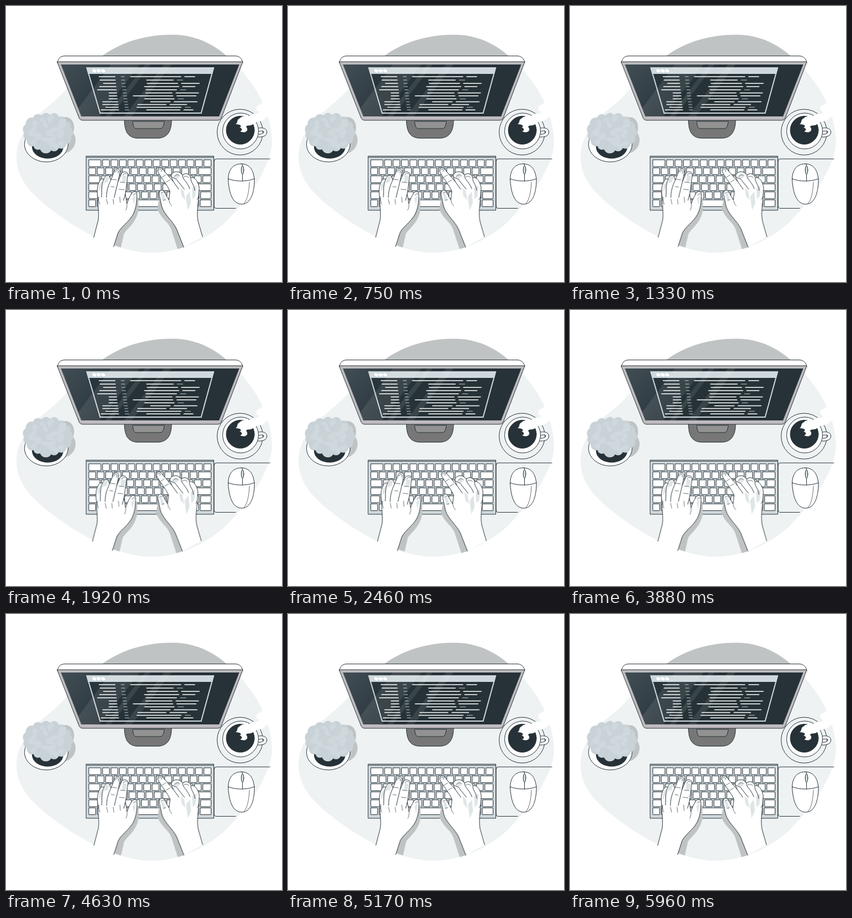
An HTML page for the animation above (6 s loop, 500x500 px).

```html
<!DOCTYPE html>
<html lang="en">
<head>
<meta charset="utf-8">
<title>Typing at a desk</title>
<style>
  html, body { margin: 0; width: 100%; height: 100%; overflow: hidden; background: #fff; }
  svg { display: block; width: 100vw; height: 100vh; }
  .line { fill: none; stroke: #263238; stroke-linecap: round; stroke-linejoin: round; }
  .thin { stroke-width: .7; }
  .white { fill: #fff; }
  .pale { fill: #cfd8dc; }
  .dark { fill: #263238; }
  .bezel { fill: #bebbbf; }
  .stand { fill: #777; }
  .inset { fill: #929292; }
  .shade { fill: #dfe5e7; }
  .shadow { fill: #bfc3c3; }
</style>
</head>
<body>
<svg viewBox="0 0 500 500">
  <defs>
    <path id="blob" d="M19 273C19 238 45 206 75 183C103 162 130 122 172 92C210 64 255 52 301 52C350 52 388 75 420 110C460 152 482 200 482 250C478 292 442 348 394 395C358 425 315 447 262 447C215 447 150 418 100 382C55 349 19 320 19 273Z"/>
    <clipPath id="inBlob"><use href="#blob"/></clipPath>
    <clipPath id="inScreen"><path id="screen" d="M99.500 106H422.500L386 200H136.500Z"/></clipPath>
    <linearGradient id="glass" x2="1" y2=".25">
      <stop offset="0" stop-color="#414e54"/>
      <stop offset=".25" stop-color="#344047"/>
      <stop offset=".5" stop-color="#263238"/>
    </linearGradient>
  </defs>

  <use href="#blob" fill="#eef2f3"/>
  <path d="M150 40H420V93H150Z" fill="#c0c3c3" clip-path="url(#inBlob)"/>

  <!-- monitor -->
  <path class="line stand" d="M214.500 206C214.500 229 222 239.500 240 239.500H274C291 239.500 300 229 300 206Z"/>
  <path class="line inset" d="M229.500 209H287L285 218Q284 222 279 222H237Q232 222 231 218Z"/>
  <path class="line white" d="M93 102C95 95 98 91 106 90.500H416C423 91 427 95 429 102Z"/>
  <path class="line bezel" d="M93 101H429L390 203Q388 207 384 207H139Q134 207 132.500 203Z"/>
  <use href="#screen" fill="url(#glass)"/>
  <g clip-path="url(#inScreen)">
    <path d="M146.500 112H376L353.500 194H170.500Z" fill="#263238" fill-opacity=".8" stroke="#cfd8dc" stroke-width="2"/>
    <path class="pale" d="M145.500 111.500H377L374 123H148.500Z"/>
    <g id="dots" class="white"></g>
    <g id="code" stroke-width="1.500"></g>
    <path d="M190 106H242L170 200H120ZM252 106H262L190 200H180ZM286 106H300L228 200H214Z" fill="#fff" opacity=".09"/>
  </g>

  <!-- plant -->
  <path class="shadow" d="M98 203C118 196 127 212 122 230C132 244 123 266 102 268Z"/>
  <ellipse class="line white" cx="73" cy="250.500" rx="39.500" ry="32"/>
  <ellipse class="dark" cx="75.500" cy="255" rx="28.500" ry="21.500"/>
  <g id="leaves"></g>

  <!-- coffee -->
  <circle class="line" cx="424" cy="228.500" r="41.500"/>
  <path class="line white" d="M452 223C460 219 472 220 472.500 228C473 237 462 238 453 237V232C460 233 467 232 467 228C467 225 460 226 453 229Z"/>
  <circle class="line white" cx="425" cy="226.500" r="32.500"/>
  <circle class="line dark" cx="424.500" cy="225" r="25.500"/>
  <path class="white" d="M416 214C421 211 417 206 424 203C429 197 437 203 444 197C451 193 455 198 459 192C451 189 452 180 460 179C465 173 474 175 478 181L482 199C478 203 475 198 469 204C463 211 455 207 449 213C443 219 437 214 435 219C441 225 434 232 424 227C430 225 427 221 423 220C429 218 424 214 416 214Z"/>

  <!-- mouse and pad -->
  <path class="line" d="M478 277H381Q377 277 377 281V362Q377 366.500 381 366.500H416"/>
  <path class="line white" d="M426 286C441 286 448 296 450 314C450 341 442 359 427 359C412 359 404 342 402.500 314C403 296 411 286 426 286Z"/>
  <path class="line" d="M402.500 313C416 318.500 436 318.500 450 313M428.500 286V317"/>
  <path class="line thin" d="M441 319C440 339 437 351 431 358"/>
  <ellipse class="line pale" cx="428.500" cy="297" rx="2.300" ry="8"/>

  <!-- keyboard -->
  <path class="line pale" d="M145.500 272H376.500V370H145.500Z"/>
  <path class="line" d="M145.500 274H376.500"/>
  <g id="keys" class="line white"></g>

  <!-- hands -->
  <g id="hands">
    <g class="shadow" clip-path="url(#inBlob)">
      <path d="M236 345L240 348V370C236 392 222 401 214 412L207 442L193 437L203 408Z"/>
      <path d="M279 340L274 368C283 388 296 392 300 407L311 441L323 437L309 402Z"/>
    </g>

    <path class="line white" d="M159 419L167 388C169 376 166 362 167 350C164 338 165 325 169 319C171 313 175 312 177 314C179 307 186 304 188 310L190 315L196 300C198 293 206 294 206.500 299C206 306 204 312 203 318L209 304C211 299 220 299 221 305C219 318 218 330 216 341Q218 350 219 358C222 350 226 340 230 337C234 334 238 338 237 343C237 355 236 366 230 378C222 392 208 400 203 411L195 436"/>
    <path class="shade" d="M178 314C181 307 187 307 187 311L184 319L177 321ZM169 323L175 317L172 331L168 336ZM211 306L219 308L217 318L210 320ZM229 349L235 342L232 361Z"/>
    <path class="line" d="M177 314C172 325 174 335 173 346M190 315C184 328 182 336 182 347M203 318L196 347M216 341L213 352"/>
    <path class="line thin" d="M198 301Q199 296 204 299L203 303M212 306Q213 302 219 304M231 343Q232 338 236 341M192 314L200 315M190 327L196 328M207 319L216 320M205 332L214 333M168 346Q167 354 170 359M182 350L184 359M194 350L195 359M206 346L207 356M219 358Q220 365 217 370"/>

    <path class="line white" d="M322 437L309 404C302 389 287 379 282 363L278 344C276 337 280 332 284 334C288 337 290 344 295 351L297 336C293 325 281 312 275 300C273 294 280 290 284 296L303 318L299 309C300 301 307 299 314 301L320 306C325 302 332 303 335 311C342 309 348 318 350 329L349 345C348 360 345 375 348 390L356 418"/>
    <path class="shade" d="M303 309L309 304L316 308L309 314ZM316 330L322 335L325 352L318 344ZM326 345L333 336L335 357L329 370ZM337 330L345 325L343 345L338 350ZM281 341L285 339L289 351L284 353Z"/>
    <path class="line" d="M303 318L313 332M299 309C304 313 309 312 311 317L323 332M320 306C318 313 328 317 333 331M335 311C333 318 341 323 342 334"/>
    <path class="line thin" d="M276 298Q278 294 282 297L281 300M283 310L289 306M290 319L297 315M305 309Q309 303 314 307M322 310Q327 306 331 311M281 340Q281 336 285 338M295 351Q296 358 300 362M285 352L289 351M349 345L346 351"/>
  </g>
</svg>

<script>
  const $ = id => document.getElementById(id);

  function add(parent, tag, attrs) {
    const el = document.createElementNS('http://www.w3.org/2000/svg', tag);
    for (const name in attrs) el.setAttribute(name, attrs[name]);
    $(parent).append(el);
  }

  // Seeded random number between two bounds
  let seed = 7;
  function rand(min, max) {
    seed = seed * 16807 % 2147483647;
    return min + (max - min) * seed / 2147483647;
  }

  function stroke(x1, x2, y, color) {
    add('code', 'path', { d: `M${x1} ${y}H${x2}`, stroke: color });
  }

  for (let i = 0; i < 3; i++) {
    const x = 160 + i * 8;
    add('dots', 'ellipse', { cx: x, cy: 117.3, rx: 3.8, ry: 2.7, transform: `rotate(25 ${x} 117.3)` });
  }

  // Code: a left column, a dim column and broken lines, narrowing downwards
  for (let i = 0; i < 12; i++) {
    const y = 128 + i * 6.2 - i * i * .065;
    const left = 208 + i * .7, right = 362 - i * 1.2;
    const start = rand(225, 265), gap = rand(285, 320);
    stroke(rand(160 + i, 188), 198 + i * .6, y, '#fff');
    stroke(left, left + 7, y, '#8b989e');
    stroke(start, gap, y, '#fff');
    if (i % 3 === 1) stroke(gap + 6, gap + 17, y, '#8b989e');
    else stroke(gap + 6, rand(gap + 20, right), y, '#fff');
  }

  // Keys: a first key of its own width, regular keys, a last key that fills the row
  const key = 12.3, pitch = 15.3, rightEdge = 371.5;
  [22, key, 20, 24, 16, key].forEach((first, row) => {
    let x = 150, width = first, n = 0;
    while (x < rightEdge) {
      if (rightEdge - x - width < pitch) width = rightEdge - x;
      add('keys', 'rect', { x, y: 278.7 + row * 14.5, width, height: key, rx: .6 });
      x += width + pitch - key;
      width = row === 5 && ++n === 4 ? 6 * pitch : key;
    }
  });

  // Foliage: a ring of lobes around a core, with lighter leaves on top
  const leaf = '#c8d2d7';
  add('leaves', 'ellipse', { cx: 76, cy: 229, rx: 40, ry: 31, fill: leaf });
  for (let i = 0; i < 15; i++) {
    const a = i / 15 * 2 * Math.PI;
    add('leaves', 'circle', {
      cx: 76 + 36 * Math.cos(a), cy: 229 + 27 * Math.sin(a), r: rand(8, 11.5), fill: leaf
    });
  }
  for (let i = 0; i < 34; i++) {
    const a = rand(0, 2 * Math.PI), r = Math.sqrt(rand(0, 1));
    const x = 76 + 38 * r * Math.cos(a), y = 229 + 28 * r * Math.sin(a);
    add('leaves', 'ellipse', {
      cx: x, cy: y, rx: rand(4, 8), ry: rand(3, 5), fill: '#cfd8dc',
      transform: `rotate(${rand(0, 180)} ${x} ${y})`
    });
  }

  // Sideways shake, one step per tenth of the loop
  const steps = [0, -1, 2, -4, 4, -4, 4, -4, 2, -1, 0];
  $('hands').animate(
    steps.map(x => ({ transform: `translateX(${x}px)` })),
    { duration: 6000, iterations: Infinity, easing: 'linear' }
  );
</script>
</body>
</html>
```
